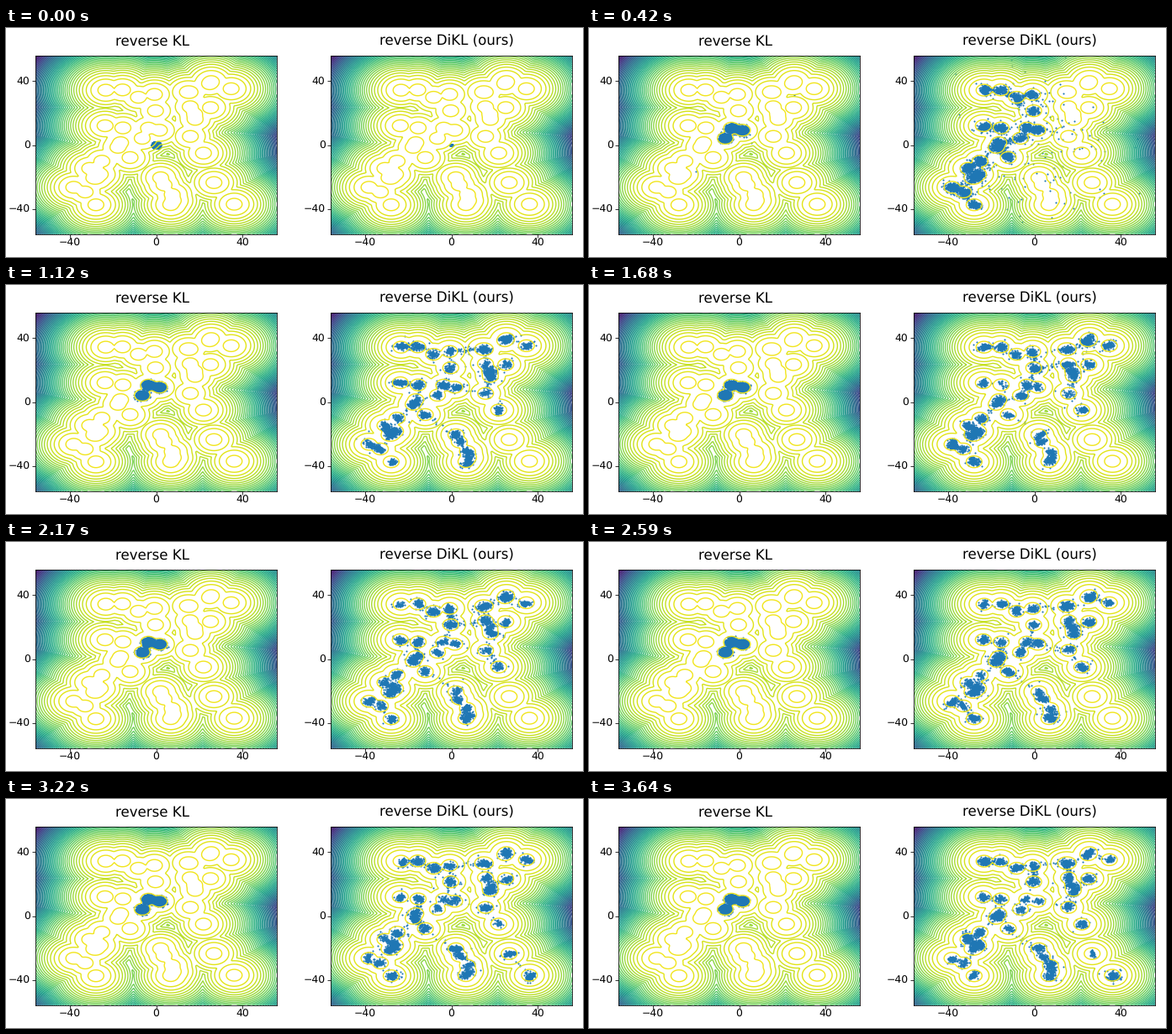
Write a matplotlib script that moves like this. It is 686x273 px and loops after 4.41 s.

```python
import numpy as np
import matplotlib.pyplot as plt
from matplotlib.animation import FuncAnimation

W, H, DPI = 686, 273, 64
PX = 72 / DPI            # points per pixel
LIM, STD = 56, np.log1p(np.e)
N_MODES, SAMPLES, STEPS = 40, 5000, 50
FRAMES, INTERVAL = 63, 70

plt.rcParams.update({"font.family": "DejaVu Sans", "text.hinting": "none",
                     "axes.linewidth": 0.8 * PX})


def mixture_centres():
    """Uniform centres in [-40, 40], from 24-bit seeded random fractions."""
    raw = np.random.RandomState(0).randint(0, 2**32, 2 * N_MODES, dtype=np.uint32)
    return ((raw & 0xFFFFFF) / 2**24 - 0.5).reshape(-1, 2) * 80


MODES = mixture_centres()


def neighbour_pairs(max_gap=20):
    """Pairs of modes with no third mode closer to both."""
    d = np.linalg.norm(MODES[:, None] - MODES, axis=-1)
    nearer = np.maximum(d[:, None, :], d[None, :, :]) < d[..., None]
    linked = ~nearer.any(axis=-1) & (d < max_gap)
    return np.argwhere(np.triu(linked, 1))


def onset_steps():
    """Step at which each mode is first covered: left, then right, then corner."""
    x, y = MODES.T
    onset = np.where(x < 2, 1, 5 + x / 8)
    return np.where((x > 26) & (y < 0), 36 + x / 6, onset)


TRAILS = neighbour_pairs()
ONSET = onset_steps()
# The collapsed sampler only keeps the modes around its start
COLLAPSED = np.argsort(np.linalg.norm(MODES, axis=1))[:3]


def log_density(n=200):
    axis = np.linspace(-LIM, LIM, n)
    gx, gy = np.meshgrid(axis, axis)
    d2 = (gx[..., None] - MODES[:, 0]) ** 2 + (gy[..., None] - MODES[:, 1]) ** 2
    expo = -d2 / (2 * STD ** 2)
    top = expo.max(axis=-1)
    total = np.exp(expo - top[..., None]).sum(axis=-1)
    return axis, top + np.log(total) - np.log(N_MODES * 2 * np.pi * STD ** 2)


def cloud(rng, n, spread):
    return rng.normal(0, spread, (n, 2))


def scatter_some(rng, pts, share, spread):
    n = int(len(pts) * share)
    pts[:n] = cloud(rng, n, spread)
    return pts


def kl_samples(step):
    rng = np.random.default_rng(100 + step)
    if step == 0:
        radius = 2 * np.sqrt(rng.random(SAMPLES))
        angle = rng.uniform(0, 2 * np.pi, SAMPLES)
        return np.column_stack([radius * np.cos(angle), radius * np.sin(angle)])
    pts = MODES[rng.choice(COLLAPSED, SAMPLES)] + cloud(rng, SAMPLES, 1.1)
    return scatter_some(rng, pts, 0.25 * np.exp(2 - 2 * step), 14)


def dikl_samples(step):
    rng = np.random.default_rng(500 + step)
    if step == 0:
        return cloud(rng, SAMPLES, 0.13)
    active = ONSET <= step
    early = np.exp(-max(step - 4, 0) / 4)

    # Blobs of uneven mass and shape, some samples strewn further out
    mass = rng.gamma(8, size=N_MODES) * active
    pick = rng.choice(N_MODES, SAMPLES, p=mass / mass.sum())
    shape = (1.05 + 0.2 * early) * np.eye(2) + rng.normal(0, 0.2, (N_MODES, 2, 2))
    shift = cloud(rng, N_MODES, 0.35)
    z = cloud(rng, SAMPLES, 1)
    z[rng.random(SAMPLES) < 0.1] *= 1.8
    pts = (MODES + shift)[pick] + np.einsum("nij,nj->ni", shape[pick], z)

    # Trails between neighbouring modes
    n = int(SAMPLES * (0.08 + 0.15 * early))
    weight = rng.gamma(0.7, size=len(TRAILS)) * active[TRAILS].all(axis=1)
    a, b = MODES[TRAILS[rng.choice(len(TRAILS), n, p=weight / weight.sum())].T]
    pts[:n] = a + (b - a) * rng.random((n, 1)) + cloud(rng, n, 0.9)
    return scatter_some(rng, pts, 0.6 * np.exp(1 - step), 20)


def add_panel(left, title, title_x, field):
    ax = fig.add_axes([left / W, 1 - 246 / H, 287 / W, 213 / H])
    ax.contour(field[0], field[0], field[1], levels=50, linewidths=1.4 * PX)
    ax.set(xlim=(-LIM, LIM), ylim=(-LIM, LIM),
           xticks=(-40, 0, 40), yticks=(-40, 0, 40))
    ax.tick_params(labelsize=12.4 * PX, length=3.6 * PX, width=0.8 * PX)
    ax.tick_params(axis="x", pad=1.5 * PX)
    ax.tick_params(axis="y", pad=2.8 * PX)
    fig.text(title_x / W, 1 - 20.6 / H, title, fontsize=16.6 * PX,
             ha="center", va="baseline")
    # Dots lie beneath the contour lines
    dots, = ax.plot([], [], "o", color="#1f77b4", ms=2.1 * PX, mew=0, zorder=1)
    return dots


fig = plt.figure(figsize=(W / DPI, H / DPI), dpi=DPI, facecolor="white")
field = log_density()
kl_dots = add_panel(35, "reverse KL", 174, field)
dikl_dots = add_panel(386, "reverse DiKL (ours)", 524, field)


def update(frame):
    step = min(max(frame - 2, 0), STEPS)
    kl_dots.set_data(*kl_samples(step).T)
    dikl_dots.set_data(*dikl_samples(step).T)
    return kl_dots, dikl_dots


anim = FuncAnimation(fig, update, frames=FRAMES, interval=INTERVAL,
                     init_func=lambda: update(0), repeat=True, repeat_delay=0)
plt.show()
```
